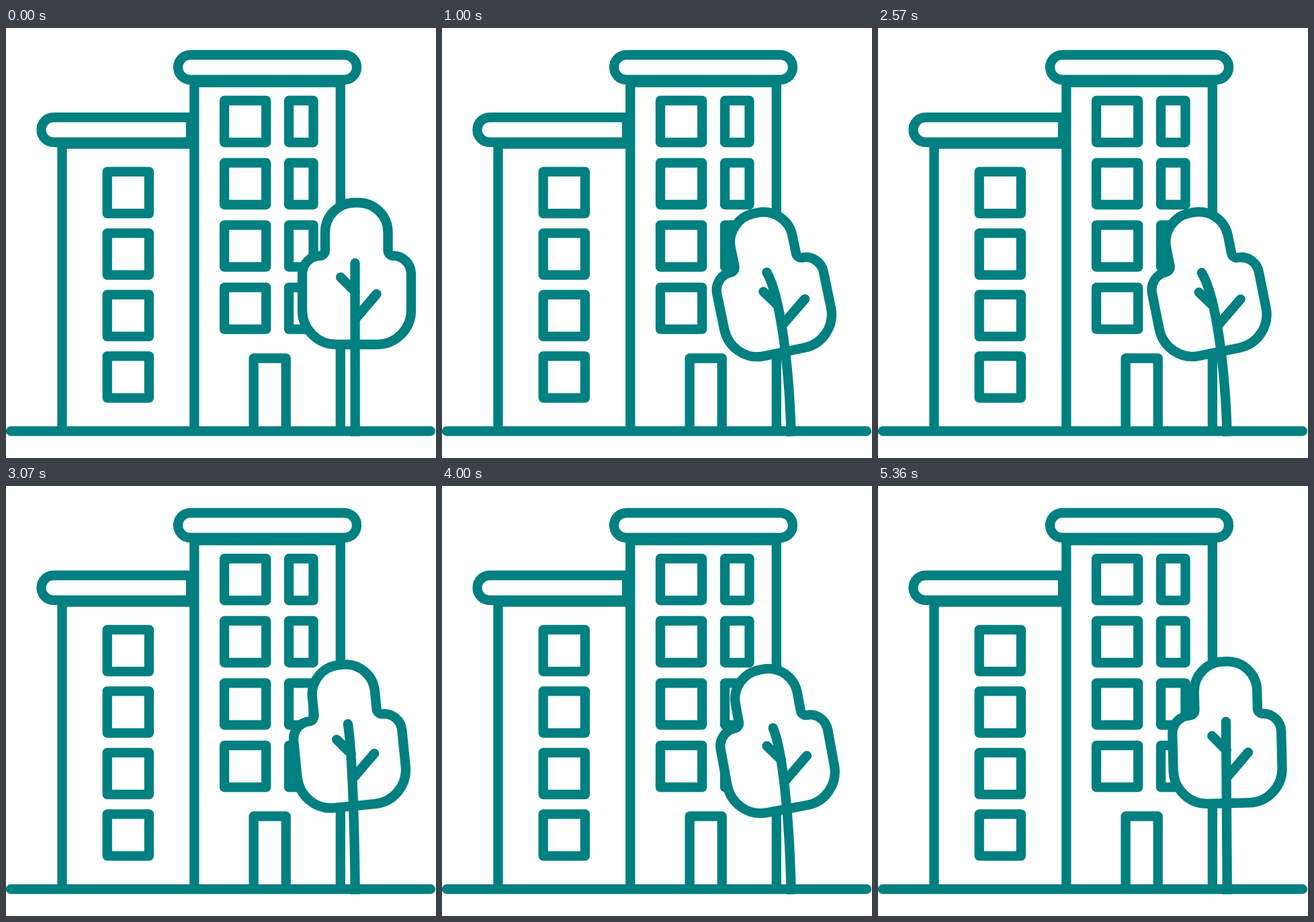
These frames come from a looping animation (640x640 px, 5.43 s). An HTML page:

```html
<!DOCTYPE html>
<html lang="en">
<head>
<meta charset="utf-8">
<title>Building and swaying tree</title>
<style>
html, body { margin: 0; width: 100%; height: 100%; overflow: hidden; background: #fff; }
svg { display: block; width: 100%; height: 100%; fill: none; stroke: #008080; stroke-width: 14.3; stroke-linecap: round; stroke-linejoin: round; }
</style>
</head>
<body>
<svg viewBox="0 0 640 640">
  <path d="M7 600H632"/>
  <path d="M83.5 600V172.5H280.3M280.3 600V81H497.8V600M368.6 600V491.5H416.7V600"/>
  <path d="M275 133H71a18.5 18.5 0 0 0 0 37H275z"/>
  <rect x="256" y="40" width="266" height="37" rx="18.5"/>
  <path id="windows"/>
  <path id="crown" fill="#fff" d="M475 304a44 44 0 0 1 44-44h5.5a44 44 0 0 1 44 44v27a8 8 0 0 0 8 8a26.5 27 0 0 1 26.5 27v54a50.5 51 0 0 1-50.5 51h-61.5a50 51 0 0 1-50-51v-54a26.5 27 0 0 1 26.5-27a7.5 8 0 0 0 7.5-8z"/>
  <path id="trunk" stroke-linecap="butt"/>
  <path id="twigs"/>
</svg>
<script>
const FPS = 14, LOOP = 5430, STEPS = 76;
const get = id => document.getElementById(id);
const crown = get("crown"), trunk = get("trunk"), twigs = get("twigs");

let panes = "";
const pane = (x, y, w) => { panes += `M${x} ${y}h${w}v62.3h${-w}z`; };
for (let row = 0; row < 4; row++) {
  pane(150.7, 213.8 + row * 91.5, 62.2);
  pane(325, 108 + row * 92.7, 62.2);
  pane(421, 108 + row * 92.7, 36.5);
}
get("windows").setAttribute("d", panes);

// Two gusts, each easing off once: step, lean, and how late a fully lagging part gets there
const GUSTS = [
  [0, 0, 0], [11, 1, 2], [19, .44, 3], [24, .95, 9], [36, .95, 4],
  [46, 0, 0], [50, 1, 4], [59, .44, 1.5], [64, 1, 4], [76, 0, 1]
];

function lean(step, lag) {
  const time = ([start, , late]) => start + late * lag;
  const i = GUSTS.findIndex(key => time(key) > step);
  const from = GUSTS[i - 1], to = GUSTS[i];
  const part = (step - time(from)) / (time(to) - time(from));
  return from[1] + (to[1] - from[1]) * (1 - Math.cos(Math.PI * part)) / 2;
}

// The crown shifts first, the trunk bends next, the crown turns last
function draw(step) {
  const shift = lean(step, 0), bend = lean(step, .4), turn = lean(step, 1);
  const at = (x, y, dx, dy) => `${x + dx * bend} ${y + dy * bend} `;
  const top = at(519.5, 350, -39.7, 15);
  crown.setAttribute("transform",
    `translate(${-14.7 * shift} ${10 * turn + 1.6 * shift}) rotate(${-11.9 * turn} 521.5 471)`);
  trunk.setAttribute("d", `M${top}C${at(519.5, 386, -17.5, 14)}${at(519.6, 500, -2.8, 4)}519.7 607.5`);
  twigs.setAttribute("d", `M${top}h.01`
    + `M${at(498, 371, -21.5, 23.5)}L${at(519.5, 392.5, -21.5, 22.5)}`
    + `M${at(551.5, 396, -12.5, 8)}L${at(520, 433, -13, 8)}`);
}

function tick(now) {
  // Steps begin on the nearest 10 ms
  draw(Math.floor((now % LOOP + 5) * FPS / 1000) % STEPS);
  requestAnimationFrame(tick);
}
draw(0);
requestAnimationFrame(tick);
</script>
</body>
</html>
```
